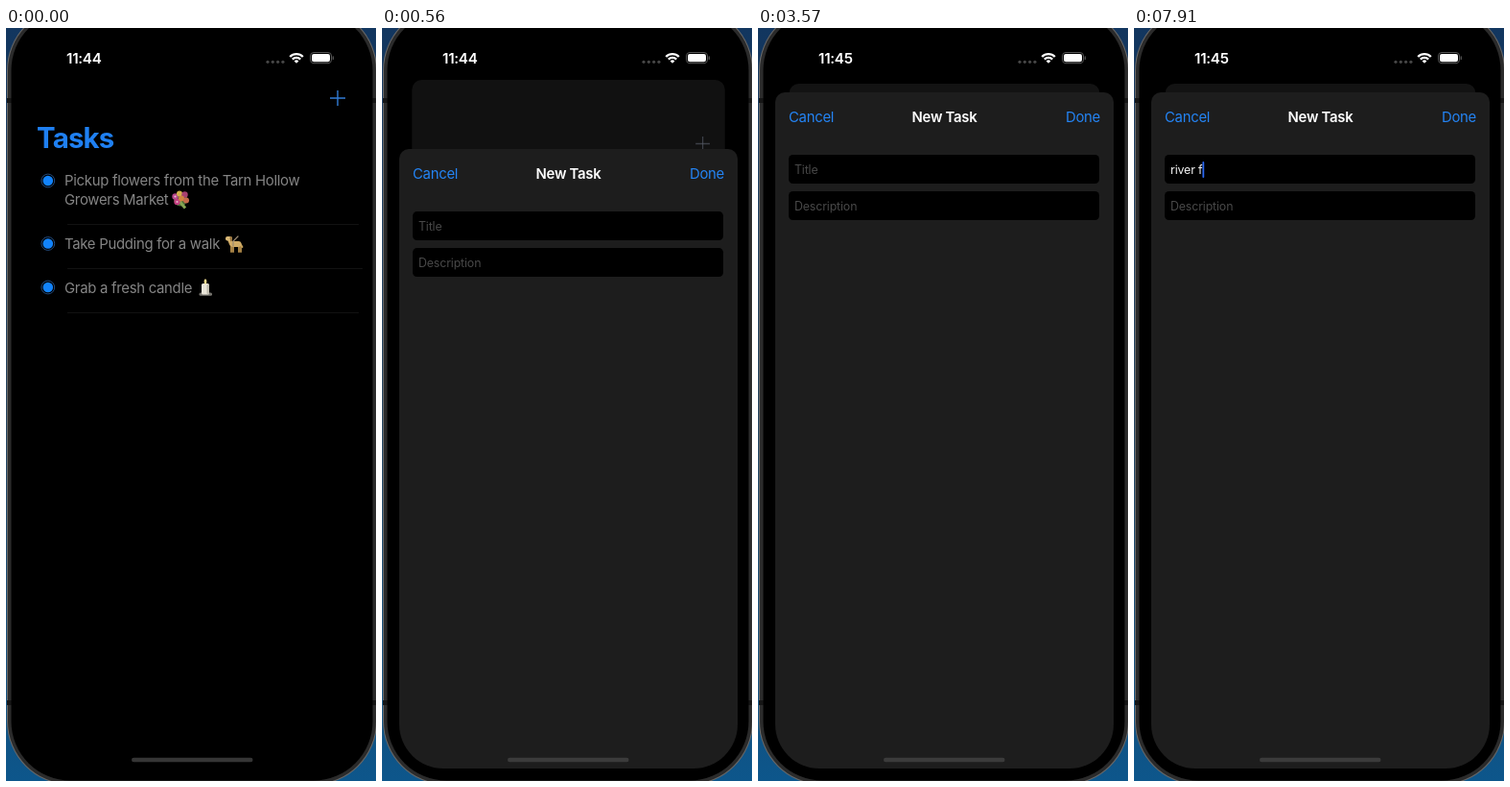
An HTML page with a canvas that plays this animation: 386x784 px, repeating every 8 s.

```html
<!DOCTYPE html>
<html lang="en">
<head>
<meta charset="utf-8">
<title>Tasks</title>
<style>
  html, body { margin: 0; width: 100%; height: 100%; overflow: hidden; background: #000; }
  canvas { display: block; width: 386px; height: 784px; }
</style>
</head>
<body>
<canvas id="stage"></canvas>
<script>
const W = 386, H = 784, LOOP = 8000, TICK = 70;
const BLUE = '#2484f4', MID = 194.5;
const canvas = document.getElementById('stage');
const ctx = canvas.getContext('2d');
const ratio = window.devicePixelRatio || 1;
canvas.width = W * ratio;
canvas.height = H * ratio;

const mix = (a, b, p) => a + (b - a) * p;
const clamp = v => Math.max(0, Math.min(1, v));
const blend = (from, to, p) => `rgb(${from.map((c, i) => Math.round(mix(c, to[i], p)))})`;

function box(x, y, w, h, r, fill) {
  ctx.beginPath();
  ctx.roundRect(x, y, w, h, r);
  if (fill) { ctx.fillStyle = fill; ctx.fill(); }
}

function disc(x, y, r, fill) {
  ctx.beginPath();
  ctx.arc(x, y, r, 0, Math.PI * 2);
  ctx.fillStyle = fill;
  ctx.fill();
}

function line(points, color, width = 1) {
  ctx.beginPath();
  points.forEach(([x, y], i) => i ? ctx.lineTo(x, y) : ctx.moveTo(x, y));
  ctx.strokeStyle = color;
  ctx.lineWidth = width;
  ctx.stroke();
}

function text(str, x, y, size, color, { weight = 400, align = 'left', track = -0.019 } = {}) {
  ctx.font = `${weight} ${size}px Inter, "Open Sans", sans-serif`;
  ctx.letterSpacing = `${track * size}px`;
  ctx.textAlign = align;
  ctx.fillStyle = color;
  ctx.fillText(str, x, y);
  return ctx.measureText(str).width;
}

// Small pictures at the end of each task, centred on the origin
function bouquet() {
  disc(0, 0, 7, '#4b6a35');
  line([[-1, 2], [5, 9]], '#86a552', 3);
  disc(-5.5, -3, 3.2, '#b8478a');
  disc(-1, -6, 3, '#d2b04a');
  disc(4.5, -5, 3.2, '#a8406f');
  disc(-3.5, 2.5, 3.2, '#c23f80');
  disc(1, -1, 3, '#cf8340');
  disc(6, 1, 3, '#c76a4a');
  disc(-5.5, -3, 1.1, '#e9c3d6');
  disc(-3.5, 2.5, 1.1, '#e6b3c8');
}

function dog() {
  ctx.lineCap = 'round';
  for (const x of [-3, -1, 5, 7]) line([[x, 1], [x, 8]], '#b78f4c', 1.8);
  line([[6, -1], [8.5, 3]], '#c9a35c', 1.8);
  box(-4, -3, 11.5, 6, 3, '#d0ab66');
  line([[-3, 0], [-5, -5]], '#d0ab66', 4);
  box(-9, -8, 7, 4.5, 2, '#d9b876');
  line([[-3.5, -7], [-3, -4]], '#94703a', 2);
  line([[-1, 2], [-1, -3], [4, -8]], '#9b8a72', 1.2);
  ctx.lineCap = 'butt';
}

function candle() {
  box(-6.5, 5.5, 13.5, 3.2, 1.5, '#77756f');
  box(-4, -4, 8, 11.5, 1.5, '#e9e5d8');
  box(1.5, -3, 2.5, 10, 1, '#c2beb0');
  ctx.beginPath();
  ctx.ellipse(0, -6, 1.4, 2.8, 0, 0, Math.PI * 2);
  ctx.fillStyle = '#f3d98c';
  ctx.fill();
}

function picture(draw, x, y) {
  ctx.save();
  ctx.translate(x, y);
  draw();
  ctx.restore();
}

function radio(y, p) {
  ctx.beginPath();
  ctx.arc(43.8, y, 6.9, 0, Math.PI * 2);
  ctx.strokeStyle = blend([35, 75, 125], [90, 90, 95], p);
  ctx.lineWidth = 1;
  ctx.stroke();
  disc(43.8, y, 5.3, blend([18, 131, 251], [110, 130, 140], p));
}

function taskList(t, p) {
  const pressed = t >= 140 && t < 280;
  const tint = blend([50, 125, 215], [90, 90, 95], p);
  ctx.save();
  ctx.globalAlpha *= pressed ? 0.35 : 1;
  line([[338, 73], [354, 73]], tint, 1.4);
  line([[346, 65], [346, 81]], tint, 1.4);
  ctx.restore();

  text('Tasks', 32, 125, 29.4, '#1f80f2', { weight: 700, track: -0.027 });
  const gray = '#858585';
  text('Pickup flowers from the Tarn Hollow', 61, 164.3, 14.9, gray);
  text('Growers Market', 61, 184, 14.9, gray);
  text('Take Pudding for a walk', 61, 230, 14.9, gray);
  text('Grab a fresh candle', 61, 275.6, 14.9, gray);
  for (const y of [159, 224.5, 270]) radio(y, p);
  picture(bouquet, 182, 178.5);
  picture(dog, 238, 225);
  picture(candle, 208, 270);
  for (const [y, end] of [[204.5, 368], [250.5, 372], [296.5, 368]])
    line([[64, y], [end, y]], '#121212');
}

function backCard(t, p) {
  const scale = 1 - 0.082 * p;
  const top = 1 + 57 * Math.pow(p, 0.86);
  ctx.save();
  ctx.translate(MID, top);
  ctx.scale(scale, scale);
  ctx.translate(-MID, -1);
  box(18, 1, 353, 770, 11, blend([0, 0, 0], [19, 19, 19], p));
  ctx.globalAlpha = 1 - 0.4 * p;
  taskList(t, p);
  ctx.restore();
  if (p > 0) box(137, 0, 113, 48, 11, '#000');
}

const KEYS = [[6510, 'r'], [6650, 'ri'], [6860, 'riv'], [7140, 'rive'],
              [7210, 'river'], [7770, 'river '], [7910, 'river f']];

function caretAlpha(t) {
  if (t < 5040) return 0;
  if (t < 6160) return 1 - clamp((t - 5740) / 210);
  return clamp((t - 6090) / 210);
}

function sheet(t, top) {
  const small = { track: -0.012 };
  const typed = KEYS.reduce((now, [at, str]) => t >= at ? str : now, '');
  ctx.save();
  ctx.translate(0, top);
  box(18, 0, 353, H, [10, 10, 0, 0], '#1d1d1d');
  text('Cancel', 32, 30.6, 14.9, BLUE);
  text('New Task', MID, 30.6, 14.9, '#fff', { weight: 600, align: 'center' });
  text('Done', 357, 30.6, 14.9, BLUE, { align: 'right' });
  box(32, 65, 324, 30, 4.5, '#000');
  box(32, 103, 324, 30, 4.5, '#000');
  text('Description', 38, 122.5, 12.4, '#484848', small);
  const width = typed
    ? text(typed, 38, 84.8, 12.4, '#f4f4f4', small)
    : (text('Title', 38, 84.8, 12.4, '#484848', small), 0);
  ctx.globalAlpha = caretAlpha(t);
  box(38 + width, 72, 1.8, 17, 0.9, '#2b67f0');
  ctx.restore();
}

function phone() {
  const wall = ctx.createLinearGradient(0, 0, 0, H);
  wall.addColorStop(0, '#12365f');
  wall.addColorStop(0.5, '#22405a');
  wall.addColorStop(1, '#0d568b');
  ctx.fillStyle = wall;
  ctx.fillRect(0, 0, W, H);
  box(1, -22, 386, 810, 66, '#686868');
  box(2, -21, 384, 808, 65, '#2b2b2b');
  ctx.fillStyle = '#161616';
  for (const y of [73, 700])
    for (const x of [1, 382]) ctx.fillRect(x, y, 5, 5);
  box(5.5, -17.5, 377, 801, 61.5, '#000');
}

function statusBar(t) {
  text(t < 3570 ? '11:44' : '11:45', 63, 36.8, 15.2, '#fff', { weight: 600 });
  for (let i = 0; i < 4; i++) disc(273 + i * 5.3, 35.3, 1.6, '#474747');
  ctx.strokeStyle = '#fff';
  ctx.lineWidth = 2.3;
  for (const r of [9.6, 5.9]) {
    ctx.beginPath();
    ctx.arc(303, 36.8, r, -Math.PI * 0.75, -Math.PI * 0.25);
    ctx.stroke();
  }
  ctx.beginPath();
  ctx.moveTo(303, 36.8);
  ctx.arc(303, 36.8, 3.4, -Math.PI * 0.75, -Math.PI * 0.25);
  ctx.fillStyle = '#fff';
  ctx.fill();
  box(317.5, 25.5, 22, 11.2, 3.5);
  ctx.strokeStyle = '#565656';
  ctx.lineWidth = 1;
  ctx.stroke();
  box(319, 27, 19, 8.2, 2.2, '#fff');
  box(340.6, 29.3, 1.3, 3.7, 0.6, '#565656');
}

// Critically damped spring, 0 to 1
function spring(t) {
  const x = Math.max(0, t - 328.7) * 0.01786;
  return t >= 910 ? 1 : 1 - (1 + x) * Math.exp(-x);
}

function render(now) {
  const t = Math.floor(now % LOOP / TICK) * TICK;
  const p = spring(t);
  ctx.setTransform(ratio, 0, 0, ratio, 0, 0);
  phone();
  ctx.save();
  box(p > 0 ? 18 : 6, -40, p > 0 ? 353 : 376, 811, 46);
  ctx.clip();
  backCard(t, p);
  if (p > 0) sheet(t, mix(784, 67, p));
  ctx.restore();
  statusBar(t);
  box(131, 759.7, 126.5, 4.6, 2.3, p > 0 ? '#3b3b3b' : '#353535');
}

const start = performance.now();
function loop() {
  render(performance.now() - start);
  requestAnimationFrame(loop);
}
loop();
</script>
</body>
</html>
```
